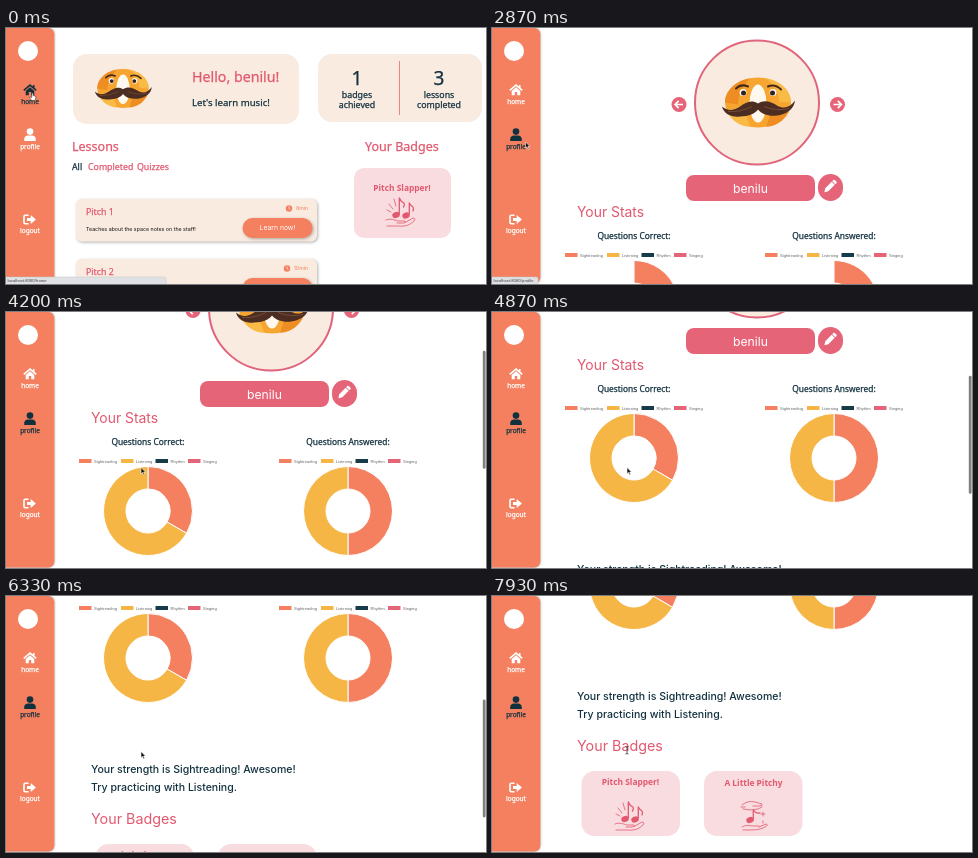
An HTML page that plays this animation: 480x256 px, repeating every 8 s.

```html
<!DOCTYPE html>
<html lang="en">
<head>
<meta charset="utf-8">
<title>Music lessons</title>
<style>
:root { --c: #12313f; }
html, body { margin: 0; width: 100%; height: 100%; overflow: hidden; background: #fff; }
svg { display: block; width: 100%; height: 100%; }
text { font-family: "Noto Sans", "Open Sans", sans-serif; fill: var(--c); stroke: var(--c); stroke-width: 0; }
.m { font-family: Inter, sans-serif; }
.a { font-family: "Liberation Sans", sans-serif; --c: #666; }
.mid { text-anchor: middle; }
.pink { --c: #e2586e; fill: var(--c); }
.white { --c: #fff; fill: var(--c); }
.orange { --c: #f4805f; fill: var(--c); }
.med, .med text { stroke-width: .25; }
.bold { font-weight: 600; }
.cream { fill: #f9ebe0; }
.nav { --c: #fff; }
.nav.on { --c: #12313f; }
.nav * { fill: var(--c); }
.nav .line { fill: none; stroke: var(--c); stroke-width: 1.6; }
.soft { filter: drop-shadow(1px 1.5px 1.5px rgba(0,0,0,.3)); }
.ink { fill: none; stroke: #e2586e; stroke-width: .8; stroke-linecap: round; stroke-linejoin: round; }
.ink.stem { stroke-width: 1.3; }
</style>
</head>
<body>
<svg viewBox="0 0 480 256" id="stage">
  <defs>
    <g id="face">
      <ellipse rx="33" ry="25" fill="#f6a630"/>
      <path d="M-8-24.300C-22-22-33-12-33 0L-20 2C-20-8-14-18-8-24.300Z" fill="#ee8d22"/>
      <path d="M8-24.300C22-22 33-12 33 0L21-1C21-10 15-19 8-24.300Z" fill="#fabb46"/>
      <path d="M-31 9C-26 19-17 24-8 24.300L-12 12Z" fill="#fabb46"/>
      <path d="M31 9C26 19 17 24 8 24.300L13 10Z" fill="#ee8d22"/>
      <ellipse cy="1" rx="8.500" ry="19" fill="#fff8ee"/>
      <g fill="#fff"><ellipse cx="-15" cy="-10" rx="3.400" ry="3.600"/><ellipse cx="15" cy="-10" rx="3.400" ry="3.600"/></g>
      <g fill="#35211c"><circle cx="-14.500" cy="-9.500" r="2.500"/><circle cx="14.500" cy="-9.500" r="2.500"/></g>
      <path d="M-22-14Q-17-19-10-16M10-16Q17-19 23-13" fill="none" stroke="#44291f" stroke-width="2" stroke-linecap="round"/>
      <path d="M0 1C-7-3-12 0-18 4C-24 8-30 9-36 4C-34 12-26 15-18 14C-9 14-3 11 0 7C4 12 11 14 19 13C28 12 36 7 37-2C32 5 26 7 19 3C13-1 6-3 0 1Z" fill="#4c2d22"/>
      <path d="M-30 9Q-18 10-6 4M6 4Q18 9 31 6" fill="none" stroke="#744a35" stroke-width="1"/>
    </g>
    <g id="notes">
      <g class="pink">
        <ellipse cx="-5" cy="4" rx="3.800" ry="3" transform="rotate(-20 -5 4)"/>
        <ellipse cx="5" cy="4.500" rx="3.800" ry="3" transform="rotate(-20 5 4.500)"/>
      </g>
      <path class="ink stem" d="M-1.700 3V-13Q0-9 3-8Q4-6 2.500-4M8.300 3V-8Q10-5 12-4Q13-2 12 0"/>
      <path class="ink" d="M-12-7-8-2M-14-1-10 1M-7-12-5-5"/>
      <path class="ink" d="M-15 9C-10 7-7 9-3 10H4Q6 12 2 12H-4M5 11 12 7Q15 7 13 10C8 15 3 15.500-4 15L-14 15"/>
    </g>
    <g id="hands">
      <path class="ink" d="M-12-10Q-6-15 1-13L8-11Q9-9 5-9L-1-9M-11-6Q-4-4 4-6L8-8M-13-8H-9"/>
      <ellipse class="pink" cx="-4" cy="5" rx="3.800" ry="3" transform="rotate(-20 -4 5)"/>
      <path class="ink stem" d="M-.7 4V-5Q2-1 6-2"/>
      <path class="ink" d="M9-3V1M7-1H11M9 6V8M-12 12C-7 9-4 11 0 11H5M5 12 12 9Q15 10 11 12C6 15 0 15-11 15"/>
    </g>
    <g id="next">
      <circle r="7.500" fill="#e66478"/>
      <path d="M-4 0H3.500M.3-3.600 3.900 0 .3 3.600" fill="none" stroke="#fff" stroke-width="1.700"/>
    </g>
    <g id="arrow"><path d="M0 0V6.200L1.500 5 2.600 7.400 3.600 6.900 2.600 4.600H4.500Z" fill="#111" stroke="#fff" stroke-width=".6"/></g>
    <g id="hand"><path d="M-.7-2Q0-3 .7-2V0L3 .7Q3.600 1.500 3 3.600L2.300 5H-.7L-3 2.200Q-3 .8-1.500 1.800L-.7 2Z" fill="#fff" stroke="#222" stroke-width=".5"/></g>
    <g id="beam"><path d="M-1.500-3.500Q0-3.500 0-2.500Q0-3.500 1.500-3.500M0-2.500V3M-1.500 4Q0 4 0 3Q0 4 1.500 4" fill="none" stroke="#333" stroke-width=".8"/></g>
  </defs>

  <g id="home">
    <rect class="cream" x="67" y="26" width="226" height="70" rx="14"/>
    <use href="#face" transform="translate(117 60.500) scale(.78)"/>
    <text class="pink med" x="186" y="54" font-size="14.200">Hello, benilu!</text>
    <text class="med" x="186" y="78" font-size="9.600">Let's learn music!</text>
    <rect class="cream" x="312" y="26" width="164" height="68" rx="14"/>
    <path d="M393.500 33V87" stroke="#ee8476"/>
    <g class="mid med" font-size="8.800">
      <text x="351" y="57" font-size="19">1</text>
      <text x="351" y="69.500">badges</text>
      <text x="351" y="80">achieved</text>
      <text x="433" y="57" font-size="19">3</text>
      <text x="433" y="69.500">lessons</text>
      <text x="433" y="80">completed</text>
    </g>
    <g class="med">
      <text class="pink" x="66" y="123" font-size="12.500">Lessons</text>
      <text class="pink" x="359" y="123" font-size="12.500">Your Badges</text>
      <g font-size="8.800">
        <text x="66" y="142">All</text>
        <text class="pink" x="82" y="142">Completed</text>
        <text class="pink" x="131" y="142">Quizzes</text>
      </g>
    </g>
    <g id="lessons"></g>
    <rect x="348" y="140" width="97" height="70" rx="10" fill="#f8dce0"/>
    <text class="pink bold mid" x="396" y="163" font-size="8.400">Pitch Slapper!</text>
    <use href="#notes" x="395" y="183"/>
  </g>

  <g id="profile">
    <circle class="cream" cx="265" cy="74.500" r="62" stroke="#e0647a" stroke-width="2"/>
    <use href="#face" x="266" y="74.500"/>
    <use href="#next" transform="translate(187 76.500) scale(-1 1)"/>
    <use href="#next" transform="translate(345.500 76.500)"/>
    <rect x="194" y="147" width="129" height="26" rx="8" fill="#e66478"/>
    <text class="m mid white" x="258.500" y="164.500" font-size="12.200">benilu</text>
    <rect x="326" y="146" width="25" height="27" rx="12.500" fill="#e66478"/>
    <g transform="translate(338 158.500) rotate(45)" fill="#fff">
      <path d="M-2.200-4.500H2.200V4.500L0 8-2.200 4.500ZM-2.200-7.200Q-2.200-8 0-8T2.200-7.200V-5.300H-2.200Z"/>
    </g>
    <text class="m pink" x="85" y="189" font-size="13.900">Your Stats</text>
    <g id="charts"></g>
    <g font-weight="500">
      <text class="m" x="85" y="392" font-size="10.550">Your strength is Sightreading! Awesome!</text>
      <text class="m" x="85" y="410" font-size="10.550">Try practicing with Listening.</text>
    </g>
    <text class="m pink" x="85" y="443" font-size="14.300">Your Badges</text>
    <g fill="#f8dce0">
      <rect x="89.500" y="463" width="98.500" height="65" rx="13"/>
      <rect x="212" y="463" width="98.500" height="65" rx="13"/>
    </g>
    <g class="bold mid" font-size="8.400">
      <text class="pink" x="138.500" y="476.500">Pitch Slapper!</text>
      <text class="pink" x="261.500" y="478">A Little Pitchy</text>
    </g>
    <use href="#notes" x="138" y="507"/>
    <use href="#hands" x="262" y="507"/>
  </g>

  <g id="side">
    <rect class="orange" x="-8" y="0" width="56.300" height="255.500" rx="6" style="filter:drop-shadow(.8px 0 1.200px rgba(0,0,0,.4))"/>
    <circle class="white" cx="22" cy="23" r="10"/>
    <g class="mid med" font-size="6.500">
      <g class="nav" id="navHome">
        <g transform="translate(24 62)">
          <path class="line" d="M-6.200 .4 0-4.900 6.200 .4"/>
          <path d="M2.900-5H4.500V-1.500L2.900-3ZM-4.300 .9 0-2.700 4.300 .9V5.300H1.200V2H-1.200V5.300H-4.300Z"/>
        </g>
        <text x="24" y="76">home</text>
      </g>
      <g class="nav" id="navUser">
        <g transform="translate(24 107)">
          <circle cy="-3.400" r="3.300"/>
          <path d="M-5.800 6V4C-5.800 1.600-4 .4-2.200 .4H2.200C4 .4 5.800 1.600 5.800 4V6Z"/>
        </g>
        <text x="24" y="121">profile</text>
      </g>
      <g class="nav">
        <g transform="translate(23.500 191.500)">
          <path class="line" d="M-1-4.200H-4.300Q-5.500-4.200-5.500-3V3Q-5.500 4.200-4.300 4.200H-1"/>
          <path d="M-2.500-1.500H1.200V-4.600L6.400 0 1.200 4.600V1.500H-2.500Z"/>
        </g>
        <text x="24" y="205">logout</text>
      </g>
    </g>
  </g>

  <g id="status">
    <path id="tab" fill="#dfe1e4" stroke="#c3c5c8" stroke-width=".5"/>
    <text id="link" x="1.500" y="254" font-size="4.100" style="font-family:Roboto,sans-serif;fill:#444"></text>
  </g>
  <rect id="bar" x="476.800" width="2.800" height="118" rx="1.400" fill="#808080"/>
  <use id="cursor"/>
</svg>

<script>
const LOOP = 8000, OPEN = 2670, END = 288;
const COLORS = ["#f4805f", "#f6b645", "#173c49", "#e66478"];
const $ = id => document.getElementById(id);

function lesson(y, title, time, clock) {
  return `
  <rect class="cream soft" x="70" y="${y}" width="241" height="42.500" rx="6"/>
  <text class="pink med" x="80" y="${y + 16}" font-size="8.800">${title}</text>
  <circle class="orange" cx="${clock}" cy="${y + 9.5}" r="3.200"/>
  <path d="M${clock} ${y + 7.5}v2l1.300 1" fill="none" stroke="#fff" stroke-width=".7"/>
  <text class="m orange" x="302" y="${y + 11.3}" font-size="5.200" text-anchor="end">${time}</text>
  <text class="m" x="80" y="${y + 32.3}" font-size="5.300" style="fill:#111">Teaches about the space notes on the staff!</text>
  <rect class="orange soft" x="236.500" y="${y + 19}" width="70" height="20" rx="10"/>
  <text class="m mid white" x="271.500" y="${y + 31.3}" font-size="6.800">Learn now!</text>`;
}
$("lessons").innerHTML = lesson(171, "Pitch 1", "8min", 283) + lesson(231, "Pitch 2", "10min", 281);

const LEGEND = [["Sightreading", 73], ["Listening", 115], ["Rhythm", 149.5], ["Singing", 182]];
const CHARTS = [["Questions Correct:", 142, 1 / 3], ["Questions Answered:", 342, 1 / 2]];
$("charts").innerHTML = CHARTS.map(([title, cx]) => `
  <text class="mid med" x="${cx}" y="211" font-size="8.400">${title}</text>` +
  LEGEND.map(([name, x], i) => `
    <rect x="${x + cx - 142}" y="225" width="12.500" height="4" fill="${COLORS[i]}"/>
    <text class="a" x="${x + cx - 127}" y="228.500" font-size="4.100">${name}</text>`).join("") +
  [0, 1].map(i => `<path class="slice" fill="${COLORS[i]}" stroke="#fff"/>`).join("")
).join("");
const slices = document.querySelectorAll(".slice");

// Ring sector; angles in turns, clockwise from the top
function ring(cx, cy, from, to) {
  const at = (r, turn) => {
    const a = turn * 2 * Math.PI;
    return `${cx + r * Math.sin(a)} ${cy - r * Math.cos(a)}`;
  };
  const big = to - from > .5 ? 1 : 0;
  return `M${at(44.5, from)}A44.500 44.500 0 ${big} 1 ${at(44.5, to)}` +
    `L${at(22, to)}A22 22 0 ${big} 0 ${at(22, from)}Z`;
}

const clamp = v => Math.max(0, Math.min(1, v));
const smooth = p => p * p * (3 - 2 * p);
const glide = p => smooth(1 - (1 - p) ** 1.8);
const span = (t, a, b) => clamp((t - a) / (b - a));

// start, end, distance
const SCROLLS = [[3810, 4870, 131], [5090, 6070, 83], [6310, 6930, 75], [6980, 7200, -1]];
const scrollAt = t => SCROLLS.reduce((y, [a, b, d]) => y + d * glide(span(t, a, b)), 0);

// time, x, y
const PATH = [[0, 26.5, 67.5], [70, 26.5, 67.5], [360, 24, 110], [2740, 24, 110],
  [3470, 135, 155.5], [8000, 135, 155.5]];
function cursorAt(t) {
  const i = PATH.findIndex(p => p[0] > t), a = PATH[i - 1], b = PATH[i];
  const p = smooth(span(t, a[0], b[0]));
  return [a[1] + (b[1] - a[1]) * p, a[2] + (b[2] - a[2]) * p];
}

function draw(t) {
  const opened = t >= OPEN, y = Math.round(scrollAt(t));
  $("home").style.display = opened ? "none" : "";
  $("profile").style.display = opened ? "" : "none";
  $("profile").setAttribute("transform", `translate(0 ${-y})`);
  $("side").setAttribute("transform", `translate(0 ${Math.min(0, END - y)})`);
  $("navHome").classList.toggle("on", !opened);
  $("navUser").classList.toggle("on", t >= 280);

  const grow = 1 - (1 - span(t, OPEN, OPEN + 1000)) ** 4;
  CHARTS.forEach(([, cx, part], i) => {
    slices[i * 2].setAttribute("d", ring(cx, 277, 0, part * grow));
    slices[i * 2 + 1].setAttribute("d", ring(cx, 277, part * grow, grow));
  });

  const far = t < 280, w = far ? 160 : 46;
  $("tab").setAttribute("d", `M-1 257V249H${w - 2}Q${w} 249 ${w} 251V257Z`);
  $("link").textContent = "localhost:8080/" + (far ? "home" : "profile");
  $("status").style.opacity = 1 - span(t, 3470, 3870);

  $("bar").setAttribute("y", 2 + Math.min(y, END) * .472);
  $("bar").style.opacity = span(t, 3470, 3600) * (1 - span(t, 7500, 7800));

  const [x, cy] = cursorAt(t), beam = t >= 7200;
  const hand = t < 120 || (t > 250 && t < 2860);
  $("cursor").setAttribute("href", beam ? "#beam" : hand ? "#hand" : "#arrow");
  $("cursor").setAttribute("transform", `translate(${x} ${beam ? 154 : cy})`);
}

const start = performance.now();
function tick() {
  draw((performance.now() - start) % LOOP);
  requestAnimationFrame(tick);
}
tick();
</script>
</body>
</html>
```
